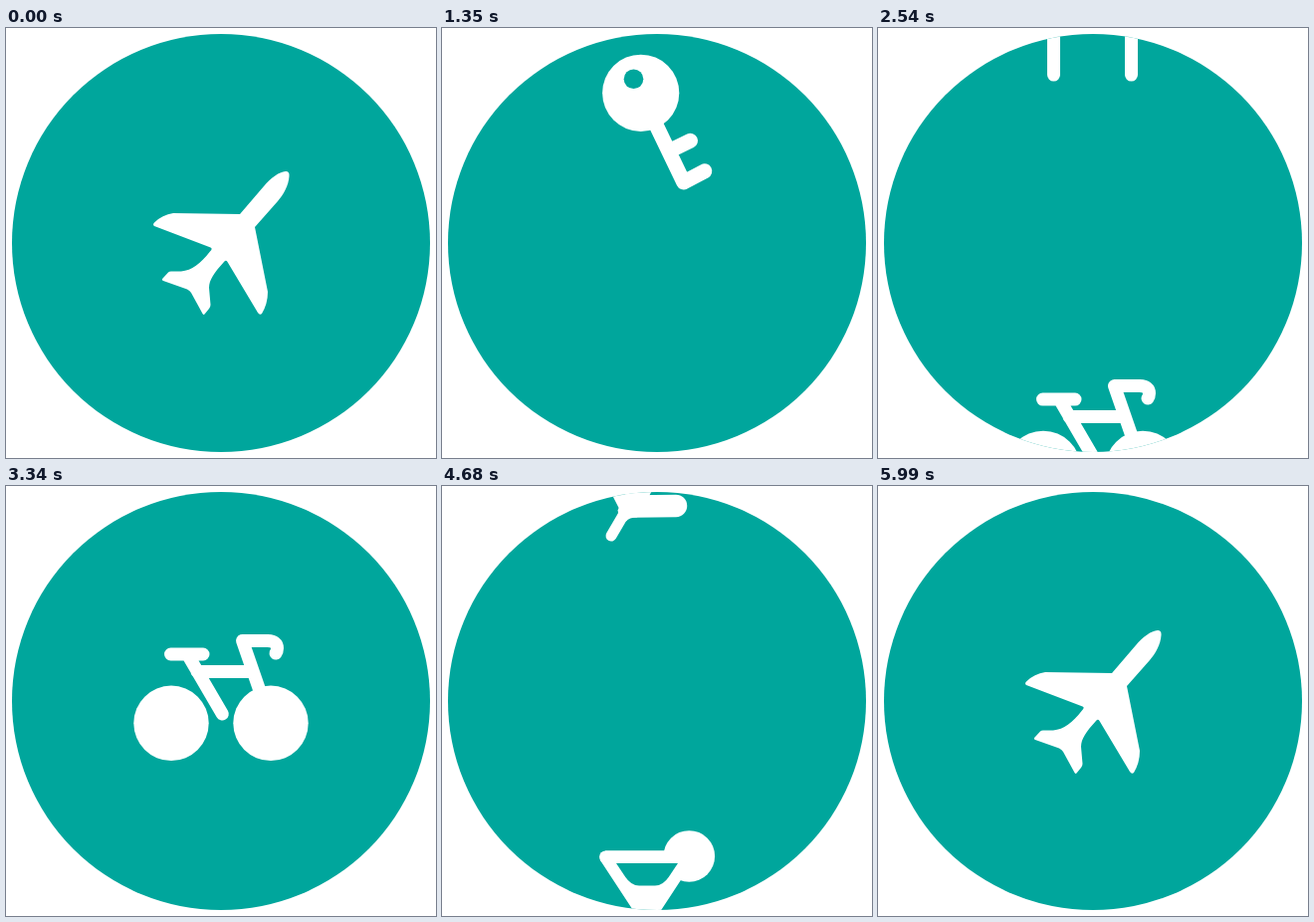
Write an HTML page that moves like this. It is 432x432 px and loops after 6490 ms.

```html
<!DOCTYPE html>
<html lang="en">
<head>
<meta charset="utf-8">
<title>Travel icons</title>
<style>
  html, body { margin: 0; height: 100%; overflow: hidden; background: #fff; }
  svg { display: block; width: 100%; height: 100%; }
  .line { fill: none; stroke: #fff; stroke-linecap: round; stroke-linejoin: round; }
  .teal { fill: #00a69c; }
</style>
</head>
<body>
<svg viewBox="0 0 432 432">
  <clipPath id="disc"><circle cx="216" cy="216" r="210"/></clipPath>
  <circle class="teal" cx="216" cy="216" r="210"/>
  <g clip-path="url(#disc)" fill="#fff">
    <g class="icon"><!-- plane -->
      <path transform="translate(0 1)" d="M281 144Q285 144 284.500 149C284 158 279 167 273 174L250 200L263 265Q263 277 257 287Q255 289 253 286L222.500 235Q221 232.500 219 235C209 246 204 253 204 261L205.500 278Q205.500 280 204 282L199.500 287.500Q198.500 288.500 197.500 287L186 266Q185 264 182 262.500L158 254Q156 253 157.500 251.500L163 245.500Q164 244.500 166 244.500L176 244.500C187 243.500 195 237 205 224.500Q208 221.500 205.500 220.500L149 199Q147 197.500 149 195.500Q157 187.500 168 186L235 187L259 159C266 151 274 144.500 281 144Z"/>
    </g>
    <g class="icon"><!-- key -->
      <circle cx="199.700" cy="187" r="38.600"/>
      <circle class="teal" cx="192.500" cy="173" r="9.800"/>
      <path class="line" stroke-width="15" d="M215 219L242.800 276.700L263.800 265.500M229 245L249.500 235"/>
    </g>
    <g class="icon"><!-- fork and spoon -->
      <path d="M148 154a6.400 6.400 0 0 1 12.800 0V192q0 4 4 4h1q4 0 4-4V154a6.500 6.500 0 0 1 13 0V192q0 4 4 4h1.200q4 0 4-4V154a6.500 6.500 0 0 1 13 0V190C205 206 197 217 187 220.500Q183 222 183 227V278.500a6.500 6.500 0 0 1-13 0V227Q170 222 166 220.500C156 217 148 206 148 190Z"/>
      <path d="M254.500 148C272 148 285 167 285 188C285 204 276 217 265 221Q261 223 261 227V278.500a6.500 6.500 0 0 1-13 0V227Q248 223 244 221C233 217 224 204 224 188C224 167 237 148 254.500 148Z"/>
    </g>
    <g class="icon"><!-- bicycle -->
      <g transform="translate(0 3.460)">
        <circle cx="166" cy="238.300" r="37.700"/>
        <circle cx="266" cy="238.300" r="37.700"/>
        <path class="line" stroke-width="13" d="M165.500 169H198M184 172L217.300 229M192 186.500H247M255 206L237.500 155.500H263Q272.500 156 272.500 163Q272.500 166 271 168"/>
      </g>
    </g>
    <g class="icon"><!-- leaf -->
      <path d="M228 165L249 178L229 207L210 238L196 263Q188 263 185 267L175 264Q178 260 176.500 256L190 227L206 195Z"/>
      <path class="line" stroke-width="22.500" d="M168 210L188 249M186 178.500L206 217M210.300 156L226 187M247 157L226 191M264.500 189L228 190M255 221.300L212 222M235 251.300L192 252"/>
      <path class="line" stroke-width="11" d="M182 261L170 281.500"/>
    </g>
    <g class="icon"><!-- cocktail -->
      <g transform="translate(0 3.850)">
        <circle cx="248.300" cy="167.500" r="25.800"/>
        <path d="M159 171.500L196 228Q199.500 233 199.500 240V276H212.500V240Q212.500 233 216 228L253 171.500L248 162H164Z"/>
        <path class="line" stroke-width="12.500" d="M164.300 168.300H245"/>
        <path class="line" stroke-width="13.500" d="M190 276H222"/>
        <path class="teal" d="M175 174.500H237L228 188Q222 197 214 197H198Q190 197 184 188Z"/>
      </g>
    </g>
  </g>
</svg>
<script>
  const LOOP = 6490, STEP = 30, TRAVEL = 432;
  // First and last step of each slide, in ms
  const slides = [[100, 670], [1170, 1740], [2240, 2840], [3340, 3880], [4380, 4980], [5480, 5990]];
  const icons = [...document.querySelectorAll('.icon')];
  const ease = p => p * p * (3 - 2 * p);

  function place(icon, y) {
    icon.style.display = '';
    icon.setAttribute('transform', `translate(0 ${y})`);
  }

  function draw(t) {
    icons.forEach(icon => icon.style.display = 'none');
    const index = slides.findLastIndex(([start]) => t >= start);
    if (index < 0) return place(icons[0], -1);
    const [start, end] = slides[index];
    const stepped = Math.floor((t - start) / STEP + 1) * STEP;
    const shift = TRAVEL * ease(Math.min(1, stepped / (end - start + STEP)));
    place(icons[index], -shift);
    place(icons[(index + 1) % icons.length], TRAVEL - shift);
  }

  const origin = performance.now();
  function tick() {
    draw((performance.now() - origin) % LOOP);
    requestAnimationFrame(tick);
  }
  tick();
</script>
</body>
</html>
```
